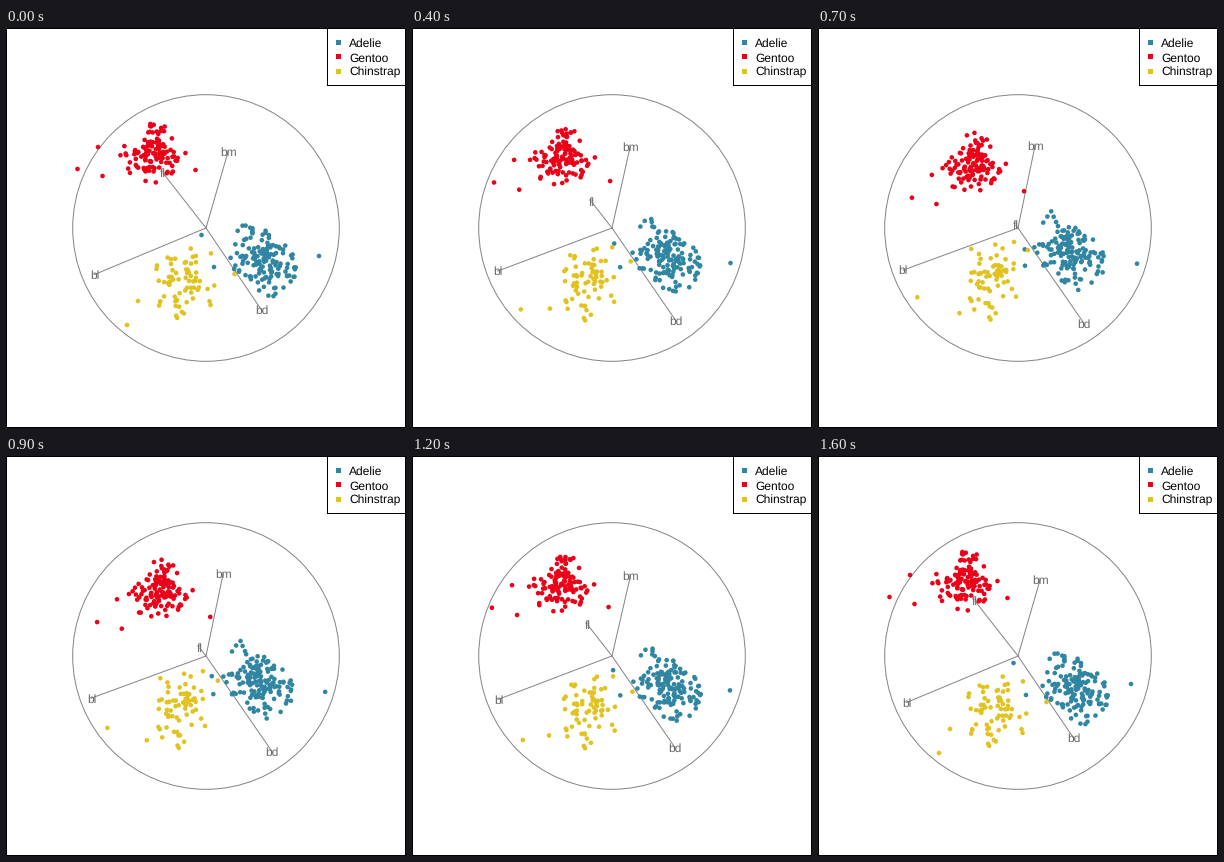
Write a matplotlib script that moves like this. It is 400 by 400 pixels and loops after 1.7 s.

```python
import numpy as np
import matplotlib.pyplot as plt
from matplotlib.animation import FuncAnimation
from matplotlib.patches import Circle, Rectangle

SIZE, DPI, RADIUS = 400, 100, 133.3
FRAMES, INTERVAL = 17, 100
STEP = 0.075  # tour speed in radians per frame
TEAL, RED, YELLOW = "#3086a2", "#ec0018", "#e2c21f"
GREY, LABEL = "#858585", "#696969"
PX = 72 / DPI
FONT = dict(family="Liberation Sans", fontsize=12 * PX, va="baseline")
plt.rcParams["text.hinting"] = "none"

# Ends of the axes in the first pose, relative to the centre.
names = ["bl", "bd", "fl", "bm"]
ends = np.array([(-111.5, 46.5), (55.5, 82), (-43, -55), (22, -76)])
fl_len = np.hypot(*ends[2])
DIR = ends[2] / fl_len
START = np.arcsin(fl_len / RADIUS)


def tour_angle(k):
    """Turn the fl axis out of the plane, then bring it back."""
    if k < 8:
        return max(START - STEP * k, 0)
    return min(STEP * (k - 8), START)


def project(xy, shift, angle):
    """Move points along the fl direction; shift is the travel at angle 0."""
    p = xy @ DIR
    inner = p + shift
    outer = (p - np.cos(START) * inner) / np.sin(START)
    moved = np.cos(angle) * inner + np.sin(angle) * outer
    return SIZE / 2 + xy + np.outer(moved - p, DIR)


def cloud(rng, n, centre, sd, corr, drift, spread, outliers):
    """Truncated normal cloud plus a few outliers: rows of x, y, shift."""
    n -= len(outliers)
    r = np.sqrt(-2 * np.log(1 - 0.93 * rng.random(n)))
    t = 2 * np.pi * rng.random(n)
    u, v = r * np.cos(t), r * np.sin(t)
    v = corr * u + np.sqrt(1 - corr**2) * v
    xy = np.column_stack([u * sd[0], v * sd[1]])
    shift = drift - 0.15 * (xy @ DIR) + rng.normal(0, spread, n)
    return np.vstack([np.column_stack([xy + centre, shift]), outliers])


def box(x, y, w, h, color, z):
    ax.add_patch(Rectangle((x, y), w, h, fc=color, lw=0, zorder=z))


def framed(x, y, w, h, z):
    """White box with a black edge one pixel wide."""
    box(x, y, w, h, "black", z)
    box(x + 1, y + 1, w - 2, h - 2, "white", z)


rng = np.random.default_rng(12)
groups = [
    ("Adelie", TEAL, cloud(rng, 146, (257, 232), (16, 17.5), 0.25, 10.4, 8,
                           [(195.5, 207, -19), (208, 239, 2), (313, 228, -9.5)])),
    ("Gentoo", RED, cloud(rng, 119, (146, 126), (15, 13.5), 0, -15.5, 6,
                          [(71.5, 141, -39), (92, 119, -38), (96.5, 148, -38),
                           (189.5, 142, -28.5)])),
    ("Chinstrap", YELLOW, cloud(rng, 68, (180, 252), (16, 18), -0.15, 6, 8,
                                [(121, 297, 37), (132, 273, -16), (228.5, 246, 32)])),
]
points = np.vstack([rows for _, _, rows in groups])
colors = [color for _, color, rows in groups for _ in rows]
point_xy, point_shift = points[:, :2] - SIZE / 2, points[:, 2]

# Only fl leaves the plane; the other axes lengthen as it shrinks.
along = ends @ DIR
end_shift = along * (1 / np.cos(START) - 1)
end_shift[2] = -along[2]

fig = plt.figure(figsize=(SIZE / DPI, SIZE / DPI), dpi=DPI, facecolor="white")
ax = fig.add_axes([0, 0, 1, 1])
ax.set(xlim=(0, SIZE), ylim=(SIZE, 0))
ax.axis("off")

framed(0, 0, SIZE, SIZE, 0)
ax.add_patch(Circle((200, 200), RADIUS, fill=False, ec=GREY, lw=PX))
lines = [ax.plot([], [], color=GREY, lw=PX, zorder=2)[0] for _ in names]
labels = [ax.text(0, 0, s, color=LABEL, ha="center", zorder=3, **FONT) for s in names]
dots = ax.scatter(*points[:, :2].T, s=(4.6 * PX) ** 2, c=colors, linewidths=0, zorder=4)

framed(321, 0, 79, 58, 5)
for i, (name, color, _) in enumerate(groups):
    y = 14.6 + 14.4 * i
    box(330, round(y - 2.5), 5, 5, color, 6)
    ax.text(343, y + 4.4, name, color="black", zorder=6, **FONT)


def draw(k):
    angle = tour_angle(k)
    for line, label, (x, y) in zip(lines, labels, project(ends, end_shift, angle)):
        line.set_data([200, x], [200, y])
        label.set_position((x + 0.3, y + 4.2))
    dots.set_offsets(project(point_xy, point_shift, angle))
    return [*lines, *labels, dots]


anim = FuncAnimation(fig, draw, frames=FRAMES, interval=INTERVAL, repeat=True)
plt.show()
```
